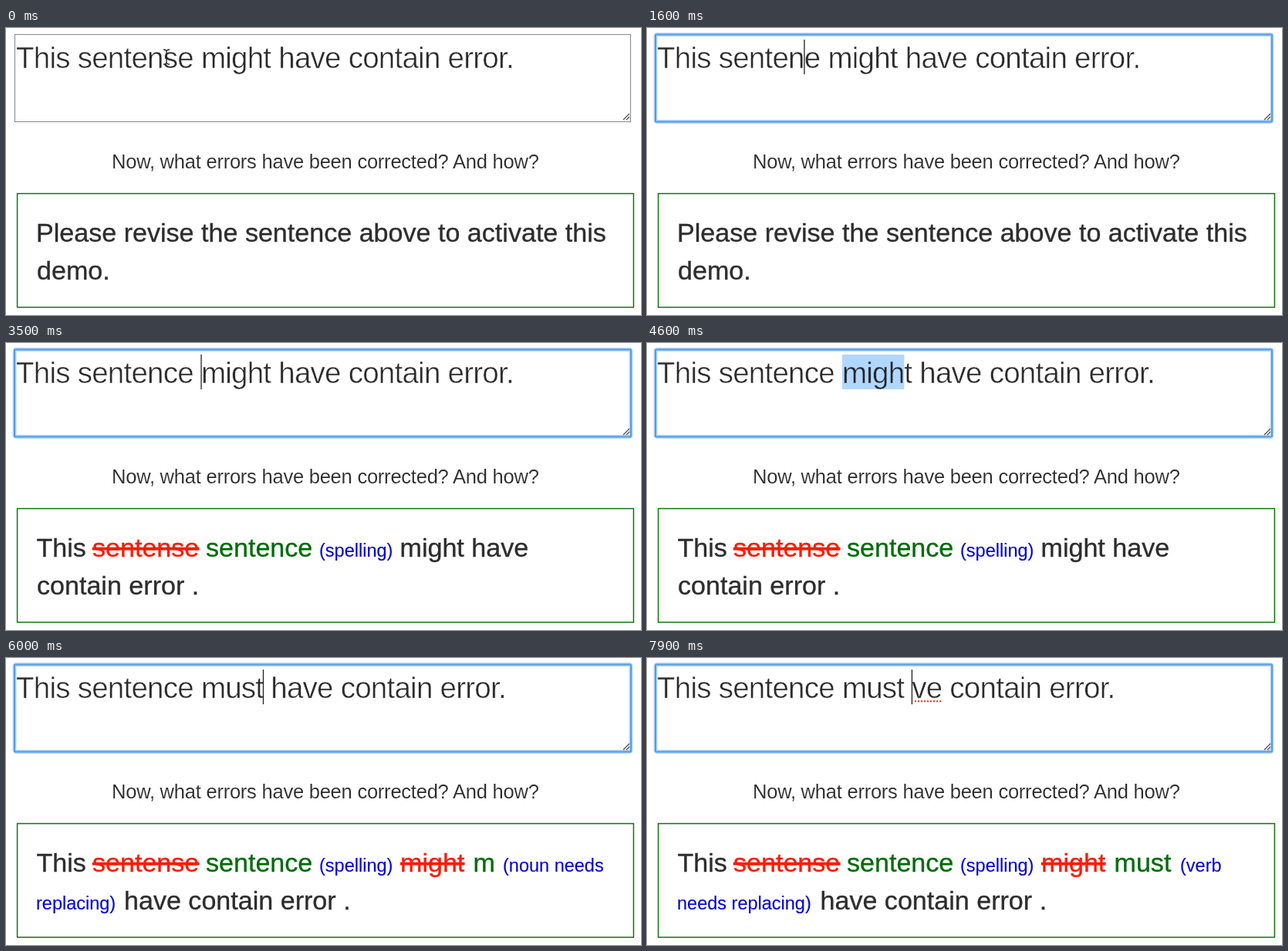
Recreate the animation shown at these times as an HTML page. Size 823 by 372 pixels, loop 8 s.

```html
<!DOCTYPE html>
<html lang="en">
<head>
<meta charset="utf-8">
<title>Sentence correction demo</title>
<style>
html, body { margin: 0; width: 100%; height: 100%; overflow: hidden; background: #fff; }
svg { display: block; width: 823px; height: 372px; }
text { font-family: "Liberation Sans", Arial, sans-serif; fill: #2b2b2b; white-space: pre; }
/* A white outline thins the regular face to a light one. */
#input { font-size: 38.5px; letter-spacing: -.75px; stroke: #fff; stroke-width: .55px; }
#caption { font-size: 25.5px; letter-spacing: -.23px; stroke: #fff; stroke-width: .15px; }
#result { font-size: 34.1px; color: #2d2d2d; stroke-width: .35px; }
#result tspan { fill: currentColor; stroke: currentColor; }
.del { color: #f91c08; text-decoration: line-through; }
.ins { color: #006b0a; }
.note { color: #0808d0; font-size: 23.5px; stroke-width: .15px; }
#selection { fill: #b2d7fe; mix-blend-mode: multiply; }
</style>
</head>
<body>
<svg viewBox="0 0 823 372" fill="none">
  <rect id="border" x="11.5" y="8.5" width="798" height="113" stroke="#888"/>
  <g id="ring">
    <rect x="11" y="8.5" width="799" height="113" rx="2" stroke="#b5d6f8" stroke-width="5"/>
    <rect x="11" y="8.5" width="799" height="113" rx="1" stroke="#559be6" stroke-width="2"/>
  </g>
  <path d="M800 119l8-8m-4 8l4-4" stroke="#555" stroke-width="1.3"/>
  <text id="input" x="13" y="52"></text>
  <rect id="selection" y="15" height="45"/>
  <rect id="caret" y="15" width="1.3" height="45" fill="#222"/>
  <path id="squiggle" d="M348 56h36" stroke="#f0442e" stroke-width="2.4" stroke-linecap="round" stroke-dasharray="0 4"/>
  <path id="mouse" d="M204 28q4 0 4 3q0-3 4-3M208 30v15M204 47q4 0 4-3q0 3 4 3M206 39h4" stroke="#222" stroke-width="1.3"/>
  <text id="caption" x="137" y="182">Now, what errors have been corrected? And how?</text>
  <rect x="14.6" y="214.6" width="798.8" height="147.4" stroke="#107510" stroke-width="1.5"/>
  <text id="result"></text>
</svg>
<script>
const LOOP = 8000, INPUT_X = 13;
const $ = id => document.getElementById(id);
const show = (id, on) => $(id).style.display = on ? "" : "none";

const original = "This sentense might have contain error.";
const spelled = "This sentence might have contain error.";
const modal = "This sentence must have contain error.";

// time, text, caret (-1: none), selection end
const edits = [
  [0, original, -1],
  [400, original, 11],
  [900, original, 12],
  [1300, "This sentene might have contain error.", 11],
  [2000, spelled, 12],
  [2900, spelled, 13],
  [3400, spelled, 14],
  [3800, spelled, 14, 15],
  [4000, spelled, 14, 16],
  [4300, spelled, 14, 17],
  [4500, spelled, 14, 18],
  [4700, spelled, 14, 19],
  [5500, "This sentence m have contain error.", 15],
  [5700, "This sentence mu have contain error.", 16],
  [5800, "This sentence mus have contain error.", 17],
  [5900, modal, 18],
  [7000, modal, 19],
  [7200, modal, 20],
  [7400, modal, 21],
  [7600, "This sentence must hve contain error.", 20],
  [7800, "This sentence must ve contain error.", 19]
];

// runs: x, line, text, class
const head = [
  [39.5, 0, "This"], [112, 0, "sentense", "del"],
  [259, 0, "sentence", "ins"], [406, 0, "(spelling)", "note"]
];
const might = [511, 0, "might", "del"];
const results = [
  [0, [[39, 0, "Please revise the sentence above to activate this"], [40, 1, "demo."]]],
  [2500, [...head, [510.5, 0, "might have"], [40, 1, "contain error ."]]],
  [5800, [...head, might, [605.5, 0, "m", "ins"], [644, 0, "(noun needs", "note"],
    [39, 1, "replacing)", "note"], [153, 1, "have contain error ."]]],
  [6600, [...head, might, [605.5, 0, "must", "ins"], [691, 0, "(verb", "note"],
    [39, 1, "needs replacing)", "note"], [224.5, 1, "have contain error ."]]]
];

const at = (steps, t) => steps.findLast(s => s[0] <= t);
const run = ([x, line, text, cls = ""]) =>
  `<tspan x="${x}" y="${277 + 49 * line}" class="${cls}">${text}</tspan>`;
const charX = n => INPUT_X + (n ? $("input").getSubStringLength(0, n) : 0);

let lastEdit, lastResult;

function draw(t) {
  const edit = at(edits, t), result = at(results, t);
  if (edit !== lastEdit) {
    const [, text, caret, end] = lastEdit = edit;
    $("input").textContent = text;
    show("selection", end);
    show("caret", caret >= 0 && !end);
    if (caret >= 0) $("caret").setAttribute("x", charX(caret) - .5);
    if (end) {
      $("selection").setAttribute("x", charX(caret));
      $("selection").setAttribute("width", charX(end) - charX(caret));
    }
  }
  if (result !== lastResult) {
    lastResult = result;
    $("result").innerHTML = result[1].map(run).join("");
  }
  show("border", t < 400);
  show("ring", t >= 400);
  show("mouse", t < 900);
  show("squiggle", t >= 7800);
}

const start = performance.now();
function tick() {
  draw((performance.now() - start) % LOOP);
  requestAnimationFrame(tick);
}
tick();
</script>
</body>
</html>
```
